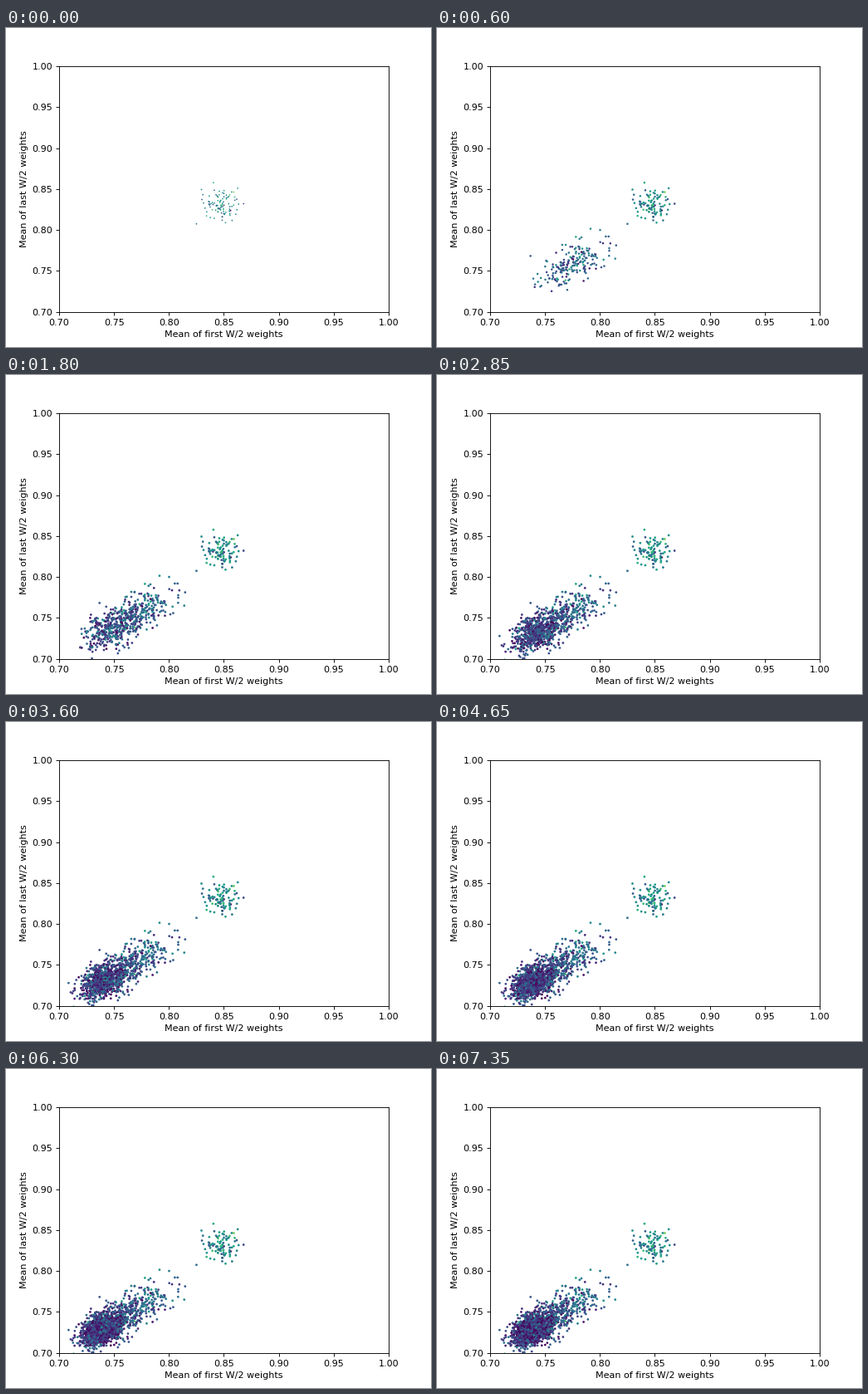
These frames come from a looping animation (512x384 px, 7.5 s). A matplotlib script:

```python
import numpy as np
import matplotlib.pyplot as plt
from matplotlib.animation import FuncAnimation

W, H, DPI = 512, 384, 80
FRAMES, STEP = 50, 150
FIRST, BROOD = 100, 50

rng = np.random.default_rng(7)


def cloud(n, center, wide, tall, tilt, tone):
    """Normal cloud: x, y in axis units, and a colour value."""
    u, v = rng.normal(size=(2, n))
    x = center[0] + wide * u
    y = center[1] + tilt * wide * u + tall * v
    return np.column_stack([x, y, np.clip(rng.normal(tone, .14, n), .02, .85)])


def brood(k):
    """Points born in generation k; the population slides down and tightens."""
    if k == 0:
        return cloud(FIRST, (.849, .832), .0095, .0115, 0, .49)
    lead = .0635 * np.exp(-k / 5)
    wide = .006 + .0068 * np.exp(-(k / 24) ** 2)
    tone = .15 + .2 * np.exp(-k / 14)
    return cloud(BROOD, (.737 + lead, .727 + .86 * lead), wide, wide, .4, tone)


broods = [brood(k) for k in range(FRAMES)]
points = np.vstack(broods)
counts = np.cumsum([len(b) for b in broods])

fig, ax = plt.subplots(figsize=(W / DPI, H / DPI), dpi=DPI)
ax.set(xlim=(.7, 1), ylim=(.7, 1),
       xlabel="Mean of first W/2 weights", ylabel="Mean of last W/2 weights")
dots = ax.scatter([], [], c=[], cmap="viridis", vmin=0, vmax=1, linewidths=0)


def draw(i):
    seen = points[:counts[i]]
    dots.set_offsets(seen[:, :2])
    dots.set_array(seen[:, 2])
    # Every dot starts thin and thickens as the run goes on
    dots.set_sizes([6.2 - 3.8 * np.exp(-i / 3)])
    return dots,


anim = FuncAnimation(fig, draw, frames=FRAMES, interval=STEP,
                     repeat=True, repeat_delay=0)
plt.show()
```
